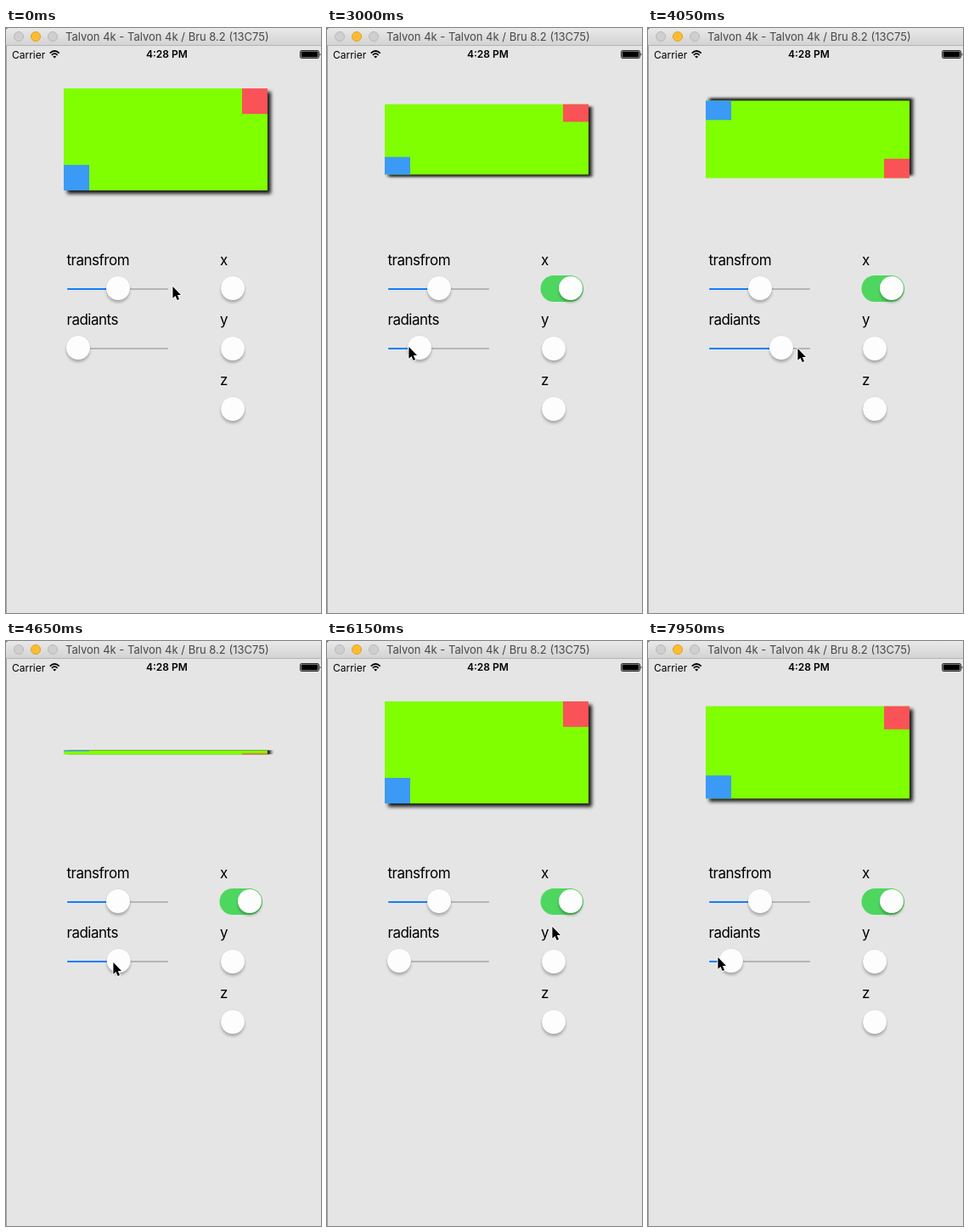
Write an HTML page that moves like this. It is 371 px wide and 688 px high and loops after 8 s.

```html
<!DOCTYPE html>
<html lang="en">
<head>
<meta charset="utf-8">
<title>Layer rotation demo</title>
<style>
  html, body { margin: 0; width: 100%; height: 100%; overflow: hidden; background: #e5e5e5; }
  svg { display: block; width: 371px; height: 688px; }
  text { font-family: Inter, Roboto, sans-serif; white-space: pre; }
  .title { font-size: 13px; fill: #484848; }
  .status { font-size: 12px; fill: #000; }
  .label { font-size: 17px; letter-spacing: -.5px; fill: #000; }
</style>
</head>
<body>
<svg viewBox="0 0 371 688">
  <defs>
    <linearGradient id="bar" x2="0" y2="1">
      <stop stop-color="#e9e9e9"/><stop offset="1" stop-color="#d2d2d2"/>
    </linearGradient>
    <filter id="cardBlur" x="-20" y="-20" width="280" height="160" filterUnits="userSpaceOnUse">
      <feGaussianBlur stdDeviation="2.2"/>
    </filter>
    <filter id="knobBlur" x="-22" y="-22" width="44" height="48" filterUnits="userSpaceOnUse">
      <feGaussianBlur stdDeviation="1.6"/>
    </filter>
    <g id="knob">
      <circle cy="3" r="14" opacity=".24" filter="url(#knobBlur)"/>
      <circle r="14.4" opacity=".07"/>
      <circle r="14" fill="#fdfdfd"/>
    </g>
  </defs>

  <rect width="371" height="688" fill="#e5e5e5"/>
  <rect y="20" width="1" height="668" fill="#a2a2a2"/>

  <rect width="371" height="21" fill="url(#bar)"/>
  <rect y="20" width="371" height="1" fill="#b4b4b4"/>
  <path d="M0 0H2L0 2Z" fill="#3b78b8"/>
  <g fill="#cfcfcf" stroke="#b9b9b9">
    <circle cx="15" cy="10" r="5.5"/>
    <circle cx="35" cy="10" r="5.5" fill="#fdbd2f" stroke="#dfa02c"/>
    <circle cx="55" cy="10" r="5.5"/>
  </g>
  <text class="title" x="70" y="15">Talvon 4k - Talvon 4k / Bru 8.2 (13C75)</text>

  <text class="status" x="7" y="35.5">Carrier</text>
  <g fill="none" stroke="#000" stroke-width="1.7">
    <path d="M51.7 29.6Q57.2 24.4 62.7 29.6M53.8 31.8Q57.2 28.6 60.6 31.8"/>
    <path d="M57.2 35.6L55.2 33.5Q57.2 31.9 59.2 33.5Z" fill="#000" stroke="none"/>
  </g>
  <text class="status" x="165" y="35.3" font-weight="600">4:28 PM</text>
  <rect x="346.5" y="26.5" width="22" height="9" rx="1.6" fill="none" stroke="#000" stroke-width=".8"/>
  <rect x="347.6" y="27.6" width="19.8" height="6.8" rx=".6"/>
  <path d="M369.6 29.2Q371.4 31 369.6 32.8Z"/>

  <g id="card">
    <rect x="4" y="4" width="240" height="120" opacity=".88" filter="url(#cardBlur)"/>
    <rect width="240" height="120" fill="#80ff00"/>
    <rect x="210" width="30" height="30" fill="#fa5357"/>
    <rect y="90" width="30" height="30" fill="#3b9af5"/>
  </g>

  <g class="label">
    <text class="label" x="71.5" y="279">transfrom</text>
    <text class="label" x="71.5" y="349">radiants</text>
    <text class="label" x="252" y="279">x</text>
    <text class="label" x="252" y="349">y</text>
    <text class="label" x="252" y="420">z</text>
  </g>

  <g fill="#b5b5b5">
    <rect x="72" y="306" width="119" height="2" rx="1"/>
    <rect x="72" y="376" width="119" height="2" rx="1"/>
  </g>
  <g fill="#147dfb">
    <rect x="72" y="306" width="60" height="2" rx="1"/>
    <rect id="fill" x="72" y="376" height="2" rx="1"/>
  </g>
  <use href="#knob" x="132" y="306"/>
  <use id="angleKnob" href="#knob" y="376"/>

  <rect id="switchOn" x="251.5" y="291" width="50.5" height="31" rx="15.5" fill="#4dd75f"/>
  <use id="switchKnob" href="#knob" y="306"/>
  <use href="#knob" x="267" y="377"/>
  <use href="#knob" x="267" y="448"/>

  <path id="cursor" d="M.4 1V14.8L3.5 11.9L5.7 17.1L8 16.1L5.8 11H10Z"
        stroke="#fff" stroke-width="1.8" stroke-linejoin="round" paint-order="stroke"/>
</svg>

<script>
const LOOP = 8000, TICK = 150;
const KNOB_MIN = 85, KNOB_MAX = 178, SWITCH_TICK = 12;

// Rows: tick, then values
const cursorKeys = [
  [0, 196, 303], [3, 146, 338], [4, 142, 341], [7, 238, 318], [9, 262, 309],
  [11, 265, 310], [12, 265, 311], [13, 230, 325], [14, 147, 343], [15, 88, 372],
  [16, 83, 374], [20, 96, 374], [23, 130, 376], [24, 130, 376], [27, 176, 376],
  [28, 196, 377], [29, 196, 377], [31, 126, 377], [33, 12, 378], [36, 152, 377],
  [39, 275, 345], [41, 265, 335], [43, 148, 318], [44, 140, 304], [50, 82, 370],
  [53, 82, 371]
];
const knobKeys = [
  [0, 85], [15, 85], [16, 86], [20, 109], [21, 117], [23, 138], [24, 138],
  [27, 157], [28, 178], [29, 178], [31, 132.7], [32, 100], [33, 85], [50, 85],
  [51, 96], [52, 96], [53, 98]
];

const el = id => document.getElementById(id);
const card = el('card'), fill = el('fill'), angleKnob = el('angleKnob');
const switchOn = el('switchOn'), switchKnob = el('switchKnob'), cursor = el('cursor');

function sample(keys, tick) {
  const next = keys.findIndex(key => key[0] > tick);
  if (next < 0) return keys[keys.length - 1].slice(1);
  const a = keys[next - 1], b = keys[next];
  const k = (tick - a[0]) / (b[0] - a[0]);
  return a.slice(1).map((v, i) => v + (b[i + 1] - v) * k);
}

function draw(tick) {
  const [x, y] = sample(cursorKeys, tick).map(Math.round);
  const [knob] = sample(knobKeys, tick);
  const angle = (knob - KNOB_MIN) / (KNOB_MAX - KNOB_MIN) * Math.PI;
  const on = tick >= SWITCH_TICK;

  // Rotation about the x axis without perspective is a vertical scale
  card.setAttribute('transform', `translate(68 131) scale(1 ${Math.cos(angle)}) translate(0 -60)`);
  angleKnob.setAttribute('x', knob);
  fill.setAttribute('width', knob - 72);
  switchOn.setAttribute('visibility', on ? 'visible' : 'hidden');
  switchKnob.setAttribute('x', on ? 287 : 267);
  cursor.setAttribute('transform', `translate(${x} ${y})`);
}

const start = performance.now();
let shown = -1;
function frame() {
  const tick = Math.floor((performance.now() - start) % LOOP / TICK);
  if (tick !== shown) draw(shown = tick);
  requestAnimationFrame(frame);
}
frame();
</script>
</body>
</html>
```
